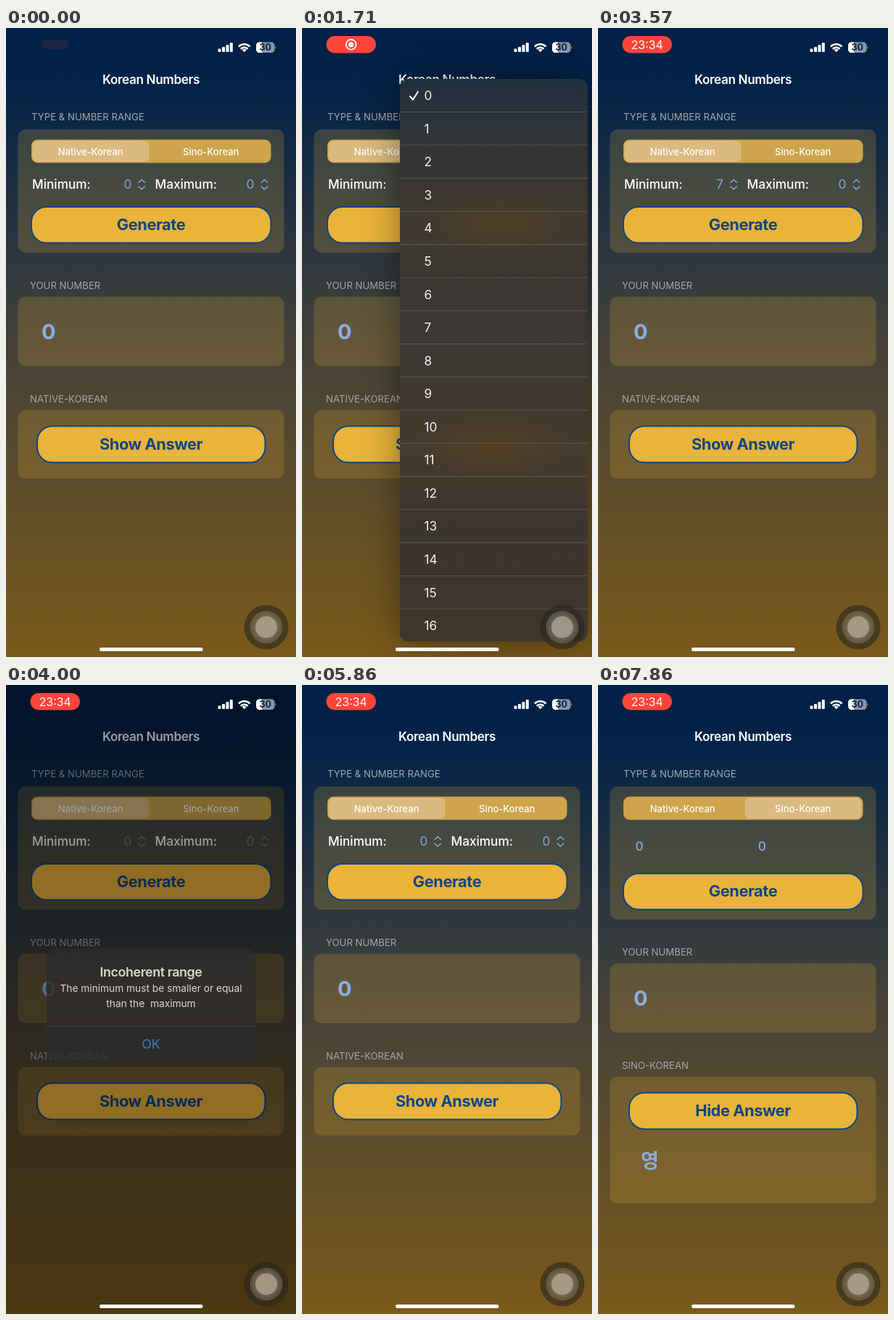
Animation, 400 px wide and 865 px high, one loop 8 s. Source, as an HTML page:

```html
<!DOCTYPE html>
<html lang="en">
<head>
<meta charset="utf-8">
<title>Korean Numbers</title>
<style>
  html, body { margin: 0; width: 100%; height: 100%; overflow: hidden; background: #002048; }
  svg { display: block; width: 100%; height: 100%; font-family: Inter, "Noto Sans", sans-serif; }
  text { white-space: pre; }
  .mid { text-anchor: middle; }
  .title { font-size: 17.1px; font-weight: 600; letter-spacing: -.02em; fill: #fff; }
  .header { font-size: 13.2px; fill: #a3a7ad; }
  .card { fill: #ebb33a; fill-opacity: .2; }
  .button rect { fill: #eab43a; stroke: #0d4486; stroke-width: 2; }
  .button text { font-size: 21.8px; font-weight: 700; letter-spacing: -.02em; fill: #0e4485; }
  .segment { font-size: 13px; font-weight: 500; fill: #fff; }
  .label { font-size: 17.2px; font-weight: 500; fill: #fff; }
  .value { font-size: 17.2px; fill: currentColor; }
  .big { font-size: 29px; font-weight: 700; fill: #8aade2; }
  .message { font-size: 13.2px; fill: #fff; }
  .item { font-size: 17.3px; fill: #f4f4f4; }
  .line { fill: none; stroke-linecap: round; stroke-linejoin: round; }
</style>
</head>
<body>
<svg viewBox="0 0 400 865" preserveAspectRatio="none">
  <defs>
    <linearGradient id="sky" x2="0" y2="1">
      <stop offset="0" stop-color="#002048"/>
      <stop offset=".1" stop-color="#042347"/>
      <stop offset=".5" stop-color="#444139"/>
      <stop offset="1" stop-color="#7b5a1a"/>
    </linearGradient>
    <linearGradient id="glass" x2="0" y2="1">
      <stop offset="0" stop-color="#23303f"/>
      <stop offset=".14" stop-color="#353535"/>
      <stop offset=".26" stop-color="#40392f"/>
      <stop offset=".42" stop-color="#393633"/>
      <stop offset=".66" stop-color="#443a2d"/>
      <stop offset=".8" stop-color="#3b352e"/>
      <stop offset="1" stop-color="#3f362a"/>
    </linearGradient>
    <radialGradient id="glow">
      <stop offset="0" stop-color="#5a431d" stop-opacity=".55"/>
      <stop offset="1" stop-color="#5a431d" stop-opacity="0"/>
    </radialGradient>
    <filter id="soft" x="-50%" y="-20%" width="200%" height="140%"><feGaussianBlur stdDeviation="26"/></filter>
    <clipPath id="battery"><rect x="345" y="19.5" width="25.5" height="14.5" rx="4.5"/></clipPath>
  </defs>

  <rect width="400" height="865" fill="url(#sky)"/>
  <text class="title mid" x="200" y="77">Korean Numbers</text>

  <text class="header" x="35" y="126.5">TYPE &amp; NUMBER RANGE</text>
  <rect id="rangeCard" class="card" x="16.5" y="139.5" width="367" height="169.5" rx="10"/>
  <rect x="35" y="153.5" width="330.5" height="32" rx="8.5" fill="#cda44b"/>
  <rect id="thumb" x="36.5" y="155" width="161" height="29" rx="7" fill="#dbba80"/>
  <text class="segment mid" x="116.7" y="174.8">Native-Korean</text>
  <text class="segment mid" x="282.7" y="174.8">Sino-Korean</text>

  <g id="pickers">
    <text class="label" x="36" y="221">Minimum:</text>
    <text class="label" x="205.5" y="221">Maximum:</text>
    <g id="tint">
      <text id="minimum" class="value mid" x="168" y="221.4">0</text>
      <text class="value mid" x="337" y="221.4">0</text>
      <path class="line" stroke="currentColor" stroke-width="1.6"
        d="M183 212.5l4.2-4 4.2 4m0 5.5l-4.2 4-4.2-4M352.3 212.5l4.2-4 4.2 4m0 5.5l-4.2 4-4.2-4"/>
    </g>
  </g>
  <g id="fields" color="#8aade2" font-weight="500">
    <text class="value mid" x="57" y="228">0</text>
    <text class="value mid" x="226.3" y="228">0</text>
  </g>

  <g id="lower">
    <g class="button">
      <rect x="35" y="246" width="330.5" height="49.5" rx="21"/>
      <text class="mid" x="200" y="278">Generate</text>
    </g>
    <text class="header" x="33" y="359">YOUR NUMBER</text>
    <rect class="card" x="16.5" y="369.5" width="367" height="95.5" rx="10"/>
    <text class="big mid" x="58.7" y="427.5">0</text>
    <text id="system" class="header" x="33" y="514.5">NATIVE-KOREAN</text>
    <rect id="answerCard" class="card" x="16.5" y="525.5" width="367" height="94" rx="10"/>
    <g class="button">
      <rect x="43" y="547.5" width="314.5" height="50" rx="21"/>
      <text id="toggle" class="mid" x="200" y="580">Show Answer</text>
    </g>
    <text id="answer" class="mid" x="71.5" y="650.5" font-size="27" font-weight="700" fill="#8aade2"
      style="font-family:'Noto Sans CJK KR','Noto Sans CJK',sans-serif">영</text>
  </g>

  <g id="menu">
    <rect x="135" y="70" width="259" height="773" rx="12" opacity=".42" filter="url(#soft)"/>
    <rect x="135" y="70" width="259" height="773.5" rx="12" fill="url(#glass)"/>
    <ellipse cx="275" cy="268" rx="115" ry="45" fill="url(#glow)"/>
    <ellipse cx="265" cy="575" rx="115" ry="48" fill="url(#glow)"/>
    <path class="line" d="M149 94l4 4.5 7-11" stroke="#fff" stroke-width="2"/>
    <g id="items"></g>
  </g>

  <rect id="dim" width="400" height="865"/>
  <g id="alert">
    <rect x="61.5" y="365.5" width="277" height="148" rx="13" fill="#2d2c2e" fill-opacity=".97"/>
    <text class="title mid" x="200" y="402.3">Incoherent range</text>
    <text class="message mid" x="200" y="423">The minimum must be smaller or equal</text>
    <text class="message mid" x="200" y="443">than the  maximum</text>
    <path d="M61.5 467.8h277" stroke="#4d4b45"/>
    <text class="mid" x="200" y="497.3" font-size="17.2" fill="#3f8fea">OK</text>
  </g>

  <g id="pill">
    <rect id="pillBody" x="33.5" y="11" width="68.5" height="23.5" rx="11.75"/>
    <g id="record">
      <circle cx="67.7" cy="22.8" r="6.9" fill="none" stroke="#fff" stroke-width="1.6"/>
      <circle cx="67.7" cy="22.8" r="3.6" fill="#fff"/>
    </g>
    <text id="clock" class="mid" x="67.7" y="28.5" font-size="15.8" fill="#fff">23:34</text>
  </g>

  <g fill="#fff">
    <rect x="292.5" y="28.5" width="4" height="4.5" rx="1"/>
    <rect x="298" y="26" width="4" height="7" rx="1"/>
    <rect x="303.4" y="23.2" width="4" height="9.8" rx="1"/>
    <rect x="308.8" y="20.3" width="4" height="12.7" rx="1"/>
    <path d="M328.7 33.3l-3-3.1a4.3 4.3 0 0 1 6 0z"/>
    <path class="line" style="stroke-linecap:butt" stroke="#fff" stroke-width="2.5"
      d="M320.9 25.5a11.2 11.2 0 0 1 15.6 0M323.8 28.8a7 7 0 0 1 9.8 0"/>
    <g clip-path="url(#battery)">
      <rect x="345" y="19" width="26" height="16" fill="#8a95a6"/>
      <rect x="345" y="19" width="8" height="16"/>
    </g>
    <path d="M371.5 24.5q2 2.3 0 4.6z" fill="#8a95a6"/>
    <text class="mid" x="357.8" y="31.4" font-size="12.6" font-weight="700" fill="#0b2547">30</text>
    <rect x="129" y="852" width="142.5" height="5" rx="2.5"/>
  </g>

  <circle cx="359" cy="824" r="30.5" fill="#29251f" fill-opacity=".6"/>
  <circle cx="359" cy="824" r="22.5" fill="#a09684" fill-opacity=".35"/>
  <circle cx="359" cy="824" r="18.5" fill="#a09684" fill-opacity=".18"/>
  <circle cx="359" cy="824" r="15" fill="#c4b9a4" fill-opacity=".62"/>
</svg>
<script>
const LOOP = 8000, STEP = LOOP / 56;
const OPEN_MENU = 1300, PICK = 2250, SHOW_CLOCK = 3400, ALERT = 3855, DISMISS = 5450,
      SINO = 6430, REVEAL = 7200;

const $ = id => document.getElementById(id);
const set = (id, attrs) => {
  for (const name in attrs) $(id).setAttribute(name, attrs[name]);
};
const ease = (t, start, duration) => {
  const x = Math.min(1, Math.max(0, (t - start) / duration));
  return 1 - (1 - x) ** 3;
};
const mix = (a, b, k) => a + (b - a) * k;
const scaleAt = (x, y, k) => `translate(${x} ${y}) scale(${k}) translate(${-x} ${-y})`;

const ROW = 45.56;
$('items').innerHTML = Array.from({ length: 17 }, (_, i) =>
  `<text class="item" x="168.5" y="${99.2 + ROW * i}">${i}</text>` +
  (i < 16 ? `<path d="M135 ${115.5 + ROW * i}h259" stroke="#77766f" stroke-opacity=".5"/>` : '')
).join('');

function render(t) {
  const menu = ease(t, OPEN_MENU, 380) - ease(t, PICK, 330);
  set('menu', { opacity: Math.min(1, menu * 1.3), transform: scaleAt(187, 215, mix(.2, 1, menu)) });

  const shown = ease(t, ALERT, 350), alert = shown - ease(t, DISMISS, 300);
  set('dim', { opacity: .48 * alert });
  set('alert', { opacity: alert, transform: scaleAt(200, 439.5, mix(1.2, 1, shown)) });
  set('tint', { color: t >= ALERT && t < DISMISS ? '#70747c' : '#85a6da' });
  $('minimum').textContent = t >= PICK && t < ALERT ? 7 : 0;

  const sino = ease(t, SINO, 350), reveal = ease(t, REVEAL, 350);
  set('thumb', { x: mix(36.5, 202.5, sino) });
  set('pickers', { opacity: 1 - sino });
  set('fields', { opacity: sino });
  set('rangeCard', { height: mix(169.5, 183, sino) });
  set('lower', { transform: `translate(0 ${13.2 * sino})` });
  set('answerCard', { height: mix(94, 174, reveal) });
  set('answer', { opacity: reveal });
  $('system').textContent = t < SINO ? 'NATIVE-KOREAN' : 'SINO-KOREAN';
  $('toggle').textContent = t < REVEAL ? 'Show Answer' : 'Hide Answer';

  const grow = ease(t, 0, 400);
  const pulse = .5 + .5 * Math.cos((t - 1800) / 1000 * Math.PI);
  set('pill', { opacity: mix(.12, 1, grow), transform: scaleAt(67.7, 22.8, mix(.54, 1, grow)) });
  set('pillBody', { fill: `rgb(${mix(212, 255, pulse)},${mix(58, 69, pulse)},${mix(53, 58, pulse)})` });
  set('record', { opacity: t < SHOW_CLOCK ? grow : 0 });
  set('clock', { opacity: t < SHOW_CLOCK ? 0 : 1 });
}

const start = performance.now();
function tick() {
  const t = (performance.now() - start) % LOOP;
  render(Math.floor((t + 6) / STEP) % 56 * STEP);
  requestAnimationFrame(tick);
}
tick();
</script>
</body>
</html>
```
